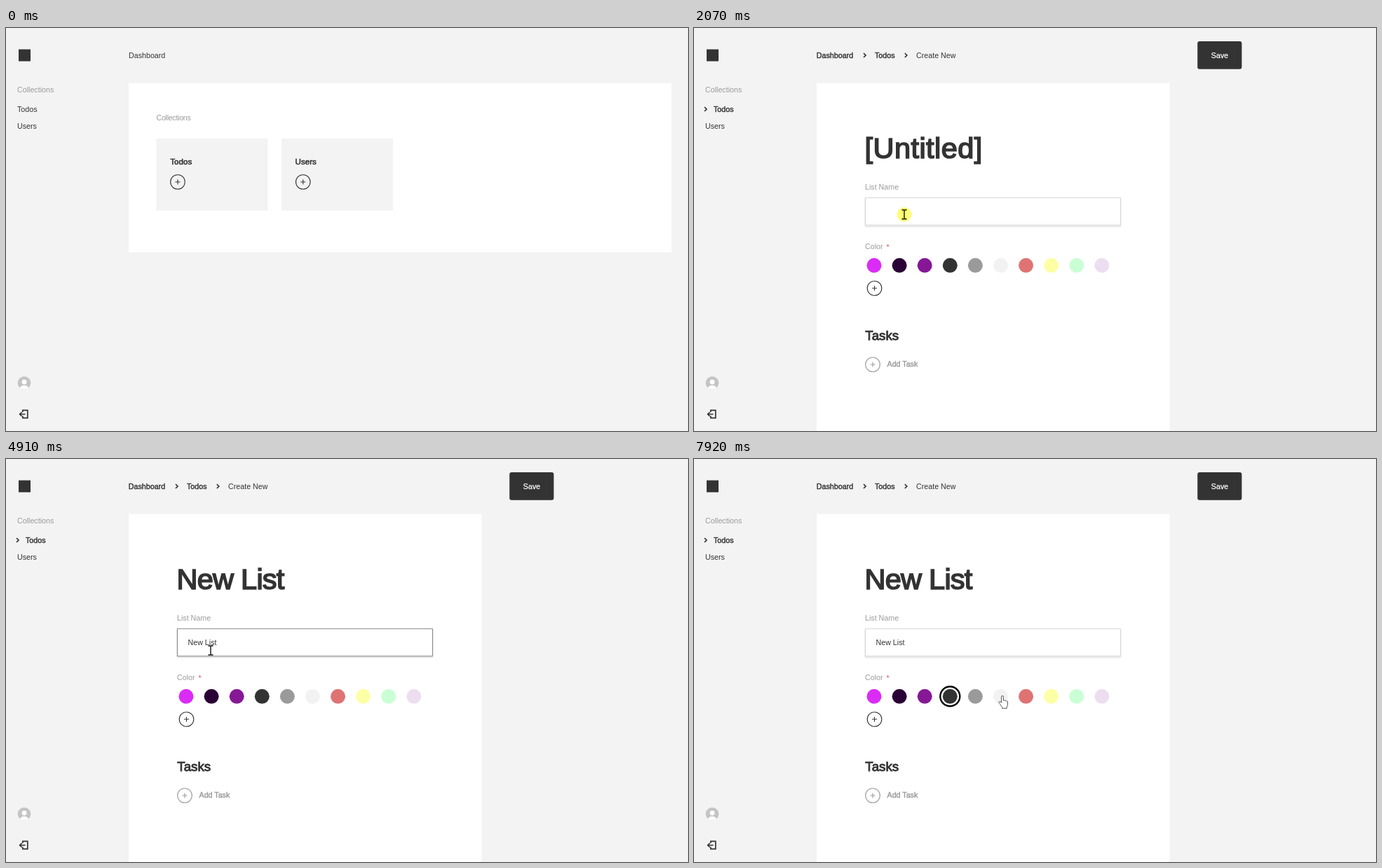
An HTML page that plays this animation: 973 px wide and 576 px high, repeating every 7990 ms.

```html
<!DOCTYPE html>
<html lang="en">
<head>
<meta charset="utf-8">
<title>Dashboard</title>
<style>
html, body { margin: 0; width: 100%; height: 100%; overflow: hidden; background: #f3f3f3; }
svg { display: block; width: 100%; height: 100%; }
text { font: 10.7px "Liberation Sans", Arial, sans-serif; fill: #333; white-space: pre; }
.med { stroke: #333; stroke-width: .4px; }
.grey { fill: #9a9a9a; }
.med.grey { stroke: #9a9a9a; }
.card { font-size: 11.6px; stroke-width: .55px; }
.title { font-size: 41.5px; stroke-width: 1.7px; }
.sub { font-size: 18.7px; stroke-width: .9px; }
.menu text { font: 500 10.2px "Open Sans", "Noto Sans", sans-serif; fill: #111; }
.line { fill: none; stroke: #333; }
.cursor { fill: #fff; stroke: #444; stroke-width: .9; }
</style>
</head>
<body>
<svg id="stage" viewBox="0 0 973 576" preserveAspectRatio="none"></svg>
<script>
const LOOP = 7990;
const SWATCHES = ['#da2cf5', '#2b0036', '#861896', '#333', '#9a9a9a',
  '#f2f2f2', '#df7373', '#fdffa4', '#cafed4', '#ecdef0'];
const swatchX = i => 257 + 36.1 * i, SWATCH_Y = 339.3;
const NAME = 'New List';
const KEYS = [3290, 3430, 3520, 3600, 3800, 3880, 3950, 4080];
const MENU = ['Dog', 'Hello', 'Helpful List', 'Hi', NAME];

// time, x, y of the pointer tip
const PATH = [
  [70, 854, 488], [720, 244, 219], [1260, 244, 219], [1390, 243, 224], [1720, 243, 224],
  [1930, 300, 266], [4430, 300, 266], [4580, 292, 270], [4840, 292, 270], [4910, 292, 273],
  [5510, 277, 313], [5720, 277, 313], [6060, 367, 337], [6460, 367, 337], [6600, 405, 378],
  [6670, 405, 378], [7130, 470, 342], [7200, 470, 342], [7330, 468, 341], [7530, 468, 341],
  [7920, 440, 339], [LOOP, 440, 339]
];
// start, end of each click glow
const CLICKS = [[1260, 1390], [2010, 2110], [6390, 6460]];
// spans in which the text caret shows
const CARET = [[2110, 2630], [3150, 4580], [5100, 5720], [6060, 6460]];

const T = { page: 1390, focus: 2080, open: 2150, close: 4150, pick: 6460 };

const text = (s, x, y, cls = '', extra = '') => `<text x="${x}" y="${y}" class="${cls}" ${extra}>${s}</text>`;
const rect = (x, y, w, h, fill, extra = '') =>
  `<rect x="${x}" y="${y}" width="${w}" height="${h}" fill="${fill}" ${extra}/>`;
const plus = (x, y, color = '#333', id = '') =>
  `<g class="line" style="stroke:${color}" stroke-width="1.1" ${id}><circle cx="${x}" cy="${y}" r="10.3"/>
   <path d="M${x - 3.5} ${y}h7M${x} ${y - 3.5}v7"/></g>`;
const chevron = (x, y) => `<path class="line" stroke-width="1.7" d="M${x - 1.5} ${y - 3}l3 3-3 3"/>`;

const shell = rect(18, 30.5, 17, 17, '#333') +
  text('Collections', 16, 92, 'grey') + text('Users', 16, 144) +
  `<clipPath id="face"><circle cx="26" cy="507.3" r="9.3"/></clipPath>
   <g clip-path="url(#face)">${rect(16, 497, 20, 21, '#c4c4c4')}
   <circle cx="26" cy="506" r="3.4" fill="#fff"/><ellipse cx="26" cy="515.6" rx="6.4" ry="4.8" fill="#fff"/></g>
   <path class="line" stroke-width="1.7" d="M23.8 549v-2.7h7v11h-7v-2.7M27.5 552h-7.5M22.6 549l-3 3 3 3"/>`;

const home = text('Dashboard', 175, 42.7) + text('Todos', 16, 119.5) +
  rect(175, 78.8, 774.5, 241.7, '#fff') +
  text('Collections', 214.5, 131.8, 'grey', 'letter-spacing="-.3"') +
  rect(214.5, 158, 159, 103, '#f3f3f3', 'id="card"') + rect(393, 158, 159, 103, '#f3f3f3') +
  text('Todos', 234.3, 195, 'med card') + text('Users', 412.6, 195, 'med card') +
  plus(245, 220, '#333', 'id="add"') + plus(423.8, 220);

const edit = chevron(16.5, 116) + text('Todos', 28, 119.5, 'med') +
  text('Dashboard', 174.8, 42.7, 'med') + chevron(243.5, 39) +
  text('Todos', 258, 42.7, 'med') + chevron(302.3, 39) + text('Create New', 317, 42.7) +
  rect(718.3, 19, 63.2, 39.7, '#333', 'rx="3"') +
  text('Save', 750, 42.6, 'med', 'text-anchor="middle" style="fill:#fff;stroke:#fff;stroke-width:.25px"') +
  rect(175, 78.8, 503.5, 498, '#fff') +
  text('', 243.5, 186.3, 'med title', 'id="title"') +
  text('List Name', 244, 231, 'grey') +
  rect(244.5, 242.7, 364, 39, '#fff', 'id="field"') +
  text('', 259.5, 266, '', 'id="value"') +
  text('Color', 244, 315.5, 'grey') + text('*', 274.6, 316.5, '', 'style="fill:#d9534f"') +
  SWATCHES.map((c, i) => `<circle cx="${swatchX(i)}" cy="${SWATCH_Y}" r="10.5" fill="${c}"/>`).join('') +
  `<circle id="ring" cx="${swatchX(3)}" cy="${SWATCH_Y}" r="14" fill="none" stroke="#000" stroke-width="2.4"/>` +
  plus(257.5, 372) +
  text('Tasks', 244.3, 445.5, 'med sub') + plus(255, 481, '#9a9a9a') +
  text('Add Task', 275.5, 484.3, 'med grey') +
  `<g id="menu" class="menu">${rect(244.3, 282.3, 152.4, 156, '#fff', 'id="sheet" rx="2" stroke="#ccc" stroke-width=".8" filter="url(#soft)"')}
   ${MENU.map((s, i) => text(s, 253.8, 307.2 + 28.55 * i)).join('')}
   <text id="match" x="253.8" y="307.2">${NAME}</text></g>` +
  rect(260, 255.3, 1, 14, '#222', 'id="caret"');

const stage = document.getElementById('stage');
stage.innerHTML = `<defs>
  <filter id="low" x="-5%" y="-20%" width="110%" height="150%"><feDropShadow dx="0" dy="1.6" stdDeviation="1.2" flood-opacity=".16"/></filter>
  <filter id="soft" x="-5%" y="-10%" width="110%" height="125%"><feDropShadow dx="0" dy="1" stdDeviation="1.3" flood-opacity=".25"/></filter>
  </defs>
  ${rect(0, 0, 973, 576, '#f3f3f3')}${shell}<g id="home">${home}</g><g id="edit">${edit}</g>
  <circle id="glow" r="10.3" fill="#ffff28"/>
  <g id="pointer">
    <path id="arrow" class="cursor" d="M0 0V13.2L3 10.4 5 15.2 7.2 14.3 5.2 9.7H9.4Z"/>
    <path id="hand" class="cursor" d="M-1.4 9.2V.9a1.4 1.4 0 0 1 2.8 0V6.2a1.2 1.2 0 0 1 2.2.4 1.2 1.2 0 0 1 2 .5 1.1 1.1 0 0 1 1.9.9V12.2Q7.3 14 6.3 15.2V17.3H-.4V15.6Q-2.2 13.6-3.2 11.6L-5 9.4a1.2 1.2 0 0 1 1.8-1.5Z"/>
    <path id="beam" class="line" style="stroke:#111" stroke-width="1.4" d="M-3.5-6h2.5q1 0 1 1 0-1 1-1h2.5M0-5.5v12M-3.5 7h2.5q1 0 1-1 0 1 1 1h2.5"/>
  </g>`;

const el = {};
stage.querySelectorAll('[id]').forEach(n => el[n.id] = n);
const show = (n, on) => n.style.display = on ? '' : 'none';
const within = (spans, t) => spans.find(([a, b]) => t >= a && t < b);

function pointerAt(t) {
  const i = Math.max(1, PATH.findIndex(p => p[0] > t));
  const [t0, x0, y0] = PATH[i - 1], [t1, x1, y1] = PATH[i];
  const u = Math.min(1, Math.max(0, (t - t0) / (t1 - t0))), k = u * u * (3 - 2 * u);
  return [x0 + (x1 - x0) * k, y0 + (y1 - y0) * k];
}

function shapeAt(t, x, y) {
  if (t < T.page) return 'arrow';
  if (x > 244 && x < 609 && y > 242 && y < 282) return 'beam';
  const over = SWATCHES.some((c, i) => Math.hypot(x - swatchX(i), y - SWATCH_Y) < 10.8);
  return over ? 'hand' : 'arrow';
}

function draw(t) {
  const [x, y] = pointerAt(t), shape = shapeAt(t, x, y);
  show(el.pointer, t >= 70);
  el.pointer.setAttribute('transform', `translate(${x.toFixed(2)} ${y.toFixed(2)})`);
  for (const s of ['arrow', 'hand', 'beam']) show(el[s], s === shape);

  const click = within(CLICKS, t);
  show(el.glow, click);
  if (click) {
    el.glow.setAttribute('cx', x);
    el.glow.setAttribute('cy', y + .5);
    el.glow.setAttribute('opacity', t - click[0] < 80 ? .65 : .35);
  }

  show(el.home, t < T.page);
  show(el.edit, t >= T.page);
  el.card.setAttribute('fill', t >= 1260 ? '#ebebeb' : '#f3f3f3');
  const hover = Math.hypot(x - 245, y - 220) < 10.5;
  el.add.firstElementChild.style.fill = hover ? '#333' : 'none';
  el.add.lastElementChild.style.stroke = hover ? '#fff' : '#333';

  const typed = NAME.slice(0, KEYS.filter(k => t >= k).length);
  el.title.textContent = typed || '[Untitled]';
  el.title.style.letterSpacing = typed ? '-.75px' : '.45px';
  el.value.textContent = typed;

  const focus = t >= T.focus && t < T.pick;
  el.field.setAttribute('stroke', focus ? '#8c8c8c' : '#d8d8d8');
  el.field.setAttribute('filter', focus ? 'url(#soft)' : 'url(#low)');
  show(el.ring, t >= T.pick);

  show(el.menu, t >= T.open && t < T.close);
  el.sheet.setAttribute('height', typed ? 41.8 : 156);
  for (const n of el.menu.querySelectorAll('text')) show(n, (n === el.match) === !!typed);

  show(el.caret, within(CARET, t));
  el.caret.setAttribute('x', typed ? 260 + el.value.getComputedTextLength() : 260);
}

const start = performance.now();
function tick() {
  draw((performance.now() - start) % LOOP);
  requestAnimationFrame(tick);
}
tick();
</script>
</body>
</html>
```
